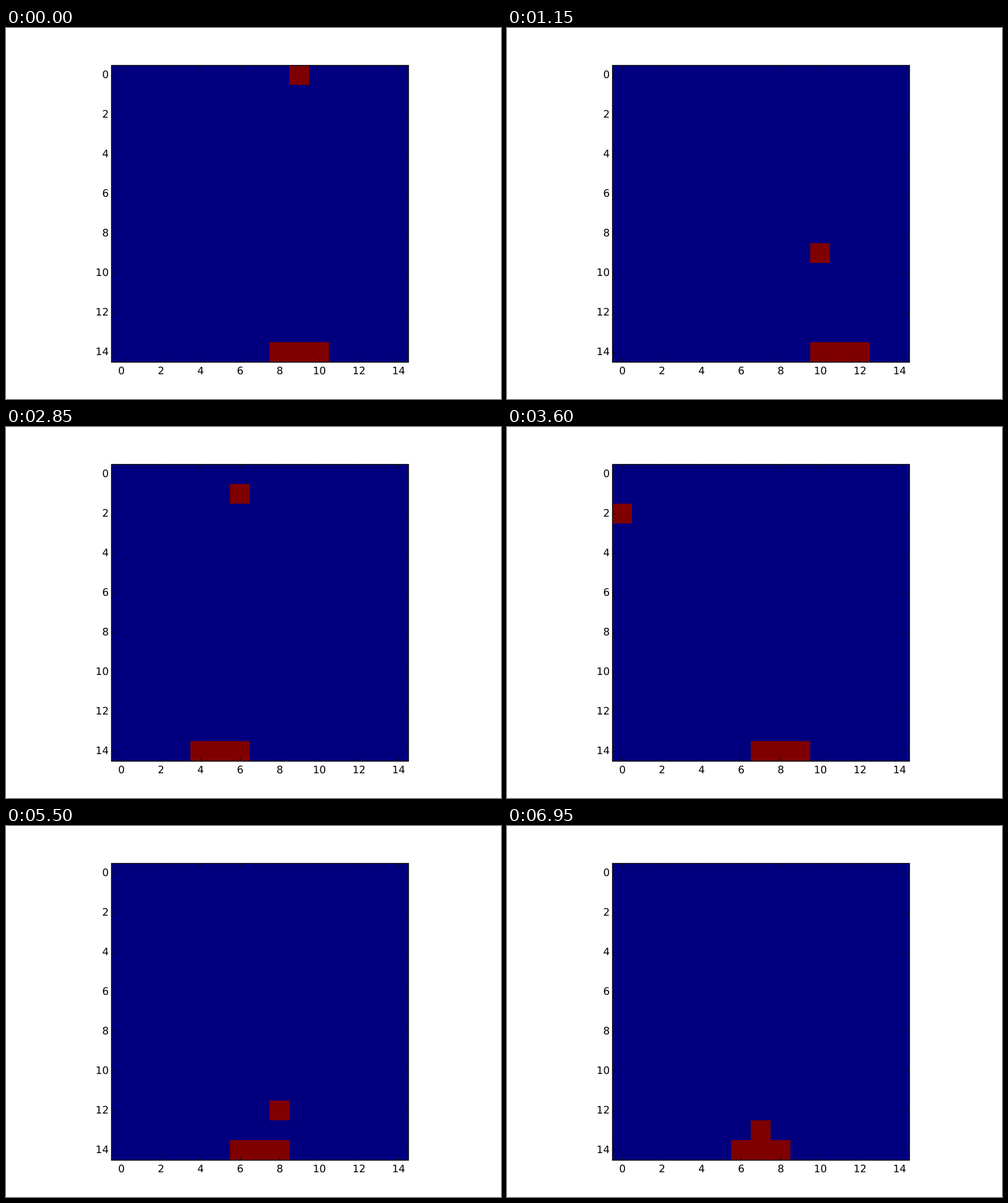
An HTML page that plays this animation: 800 by 600 pixels, repeating every 7000 ms.

```html
<!DOCTYPE html>
<html lang="en">
<head>
<meta charset="utf-8">
<title>Catch on a grid</title>
<style>
  html, body { margin: 0; width: 100%; height: 100%; overflow: hidden; background: #fff; }
  svg { display: block; width: 800px; height: 600px; }
  text {
    font: 16.67px "DejaVu Sans", Verdana, sans-serif;
    fill: #000;
    text-rendering: geometricPrecision;
  }
  .cell { fill: #7f0000; shape-rendering: crispEdges; }
  .tick { stroke: #000; stroke-width: 0.7; }
</style>
</head>
<body>
<svg viewBox="0 0 800 600">
  <rect x="170" y="60" width="480" height="480" fill="#00007f"/>
  <rect id="ball" class="cell" width="32" height="32"/>
  <rect id="paddle" class="cell" y="508" width="96" height="32"/>
  <g id="axes"></g>
  <rect x="170.5" y="60.5" width="480" height="480" fill="none" stroke="#000" stroke-width="1.39"/>
</svg>
<script>
const LEFT = 170, TOP = 60, CELL = 32, SIZE = 480, LAST = 14;
const STEP = 50, ROWS = 14, TICK = 6;

// Each drop: ball column, sideways speed, paddle start.
const drops = [
  [9, 0, 9], [10, 0, 13], [14, 0, 10], [8, 1, 10], [7, -1, 5],
  [0, 0, 8], [14, 0, 7], [8, 0, 4], [3, -1, 4], [8, 1, 10]
];

const ball = document.getElementById("ball");
const paddle = document.getElementById("paddle");
const axes = document.getElementById("axes");

function add(tag, attrs, label) {
  const el = document.createElementNS("http://www.w3.org/2000/svg", tag);
  for (const key in attrs) el.setAttribute(key, attrs[key]);
  if (label !== undefined) el.textContent = label;
  axes.append(el);
}

function tick(x, y, dx, dy) {
  add("line", { class: "tick", x1: x, y1: y, x2: x + dx, y2: y + dy });
}

for (let n = 0; n <= LAST; n += 2) {
  const mid = n * CELL + CELL / 2;
  const x = LEFT + mid + 0.5, y = TOP + mid + 0.5;
  tick(x, TOP + 0.5, 0, TICK);
  tick(x, TOP + SIZE + 0.5, 0, -TICK);
  tick(LEFT + 0.5, y, TICK, 0);
  tick(LEFT + SIZE + 0.5, y, -TICK, 0);
  add("text", { x: x, y: 560, "text-anchor": "middle" }, n);
  add("text", { x: 166, y: y + 4.5, "text-anchor": "end" }, n);
}

// Reflect a column off both side walls.
const bounce = c => LAST - Math.abs(LAST - Math.abs(c));
const smooth = t => t * t * (3 - 2 * t);

function draw(ms) {
  const step = Math.floor(ms / STEP) % (drops.length * ROWS);
  const [col, speed, from] = drops[Math.floor(step / ROWS)];
  const row = step % ROWS;

  // The paddle eases until its near edge is under the landing column.
  const landing = bounce(col + speed * LAST);
  const to = landing - Math.sign(landing - from);
  const centre = Math.round(from + (to - from) * smooth(row / (ROWS - 1)));

  ball.setAttribute("x", LEFT + CELL * bounce(col + speed * row));
  ball.setAttribute("y", TOP + CELL * row);
  paddle.setAttribute("x", LEFT + CELL * (centre - 1));
}

const start = performance.now();
function loop() {
  draw(performance.now() - start);
  requestAnimationFrame(loop);
}
loop();
</script>
</body>
</html>
```
